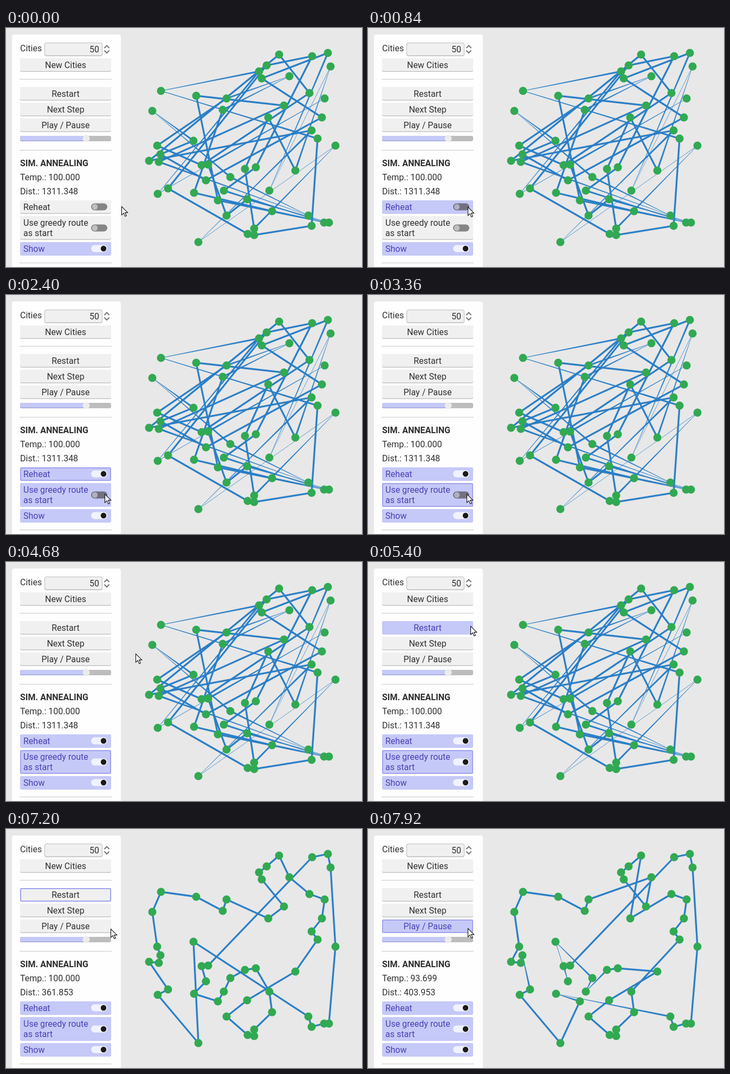
These frames come from a looping animation (657 px wide and 441 px high, 8000 ms). An HTML page:

```html
<!DOCTYPE html>
<html lang="en">
<head>
<meta charset="utf-8">
<title>Simulated annealing</title>
<style>
html, body { margin: 0; width: 100%; height: 100%; overflow: hidden; background: #e8e8e8; }
svg { display: block; width: 657px; height: 441px; font: 16px Roboto, sans-serif; }
</style>
</head>
<body>
<svg id="stage" viewBox="0 0 657 441"></svg>
<script>
const LOOP = 8000, STEP = 120;
const INK = '#303030', PURPLE = '#4a40b4', LILAC = '#c5c9f7', FOCUS = '#a0a3ee';
const stage = document.getElementById('stage');

function add(tag, attrs, text) {
  const el = document.createElementNS('http://www.w3.org/2000/svg', tag);
  set(el, attrs);
  if (text) el.textContent = text;
  return stage.appendChild(el);
}
function set(el, attrs) {
  for (const k in attrs) el.setAttribute(k, attrs[k]);
}
const rect = (x, y, width, height, fill, rx = 0) => add('rect', { x, y, width, height, fill, rx });
const label = (x, y, text, extra) => add('text', { x, y, fill: INK, ...extra }, text);
const clamp = v => Math.max(0, Math.min(1, v));
const mix = (a, b, k) => 'rgb(' + a.map((v, i) => Math.round(v + (b[i] - v) * k)) + ')';

// Cities and routes
const cities = [
  504,49, 565,52, 594,46, 599,71, 481,69, 467,80, 472,93, 523,89, 560,120, 588,130,
  286,116, 351,125, 407,130, 400,151, 513,143, 484,165, 583,165, 270,153, 564,189, 575,204,
  608,217, 346,208, 279,217, 285,233, 264,245, 282,247, 361,253, 373,252, 441,260, 461,257,
  534,263, 414,275, 369,281, 299,296, 280,306, 347,304, 402,300, 486,300, 391,318, 445,316,
  491,338, 407,346, 558,346, 564,365, 587,359, 596,359, 458,370, 446,380, 458,382, 355,395
].reduce((out, v, i, all) => (i % 2 ? out.push([all[i - 1], v]) : 0, out), []);

const shuffled = [
  48,43,19,10,5,34,9,27,41,39,45,40,35,13,7,12,22,26,8,0,24,18,49,20,46,
  28,15,30,3,37,2,6,16,32,23,21,17,31,42,25,14,11,38,44,36,29,1,4,33,47];

function greedyRoute(start) {
  const left = new Set(cities.keys()), route = [start];
  left.delete(start);
  while (left.size) {
    const [x, y] = cities[route[route.length - 1]];
    const dist = i => Math.hypot(cities[i][0] - x, cities[i][1] - y);
    const next = [...left].reduce((a, b) => dist(b) < dist(a) ? b : a);
    route.push(next);
    left.delete(next);
  }
  return route;
}

// Reverses the part of the route between two cities
function flip(route, [a, b]) {
  const i = route.indexOf(a), j = route.indexOf(b) + 1;
  return [...route.slice(0, i), ...route.slice(i, j).reverse(), ...route.slice(j)];
}

// Mitred strip that collapses at very sharp turns
function strip(route, half = 1.5) {
  const n = route.length, pts = route.map(i => cities[i]);
  const normals = pts.map(([x, y], i) => {
    const [u, v] = pts[(i + 1) % n], len = Math.hypot(u - x, v - y);
    return [(y - v) / len, (u - x) / len];
  });
  const offsets = normals.map(([x, y], i) => {
    const [u, v] = normals[(i + n - 1) % n], len = Math.hypot(x + u, y + v) || 1e-3;
    const k = len < 0.49 ? half / len : 2 * half / (len * len);
    return [(x + u) * k, (y + v) * k];
  });
  const at = (i, sign) => pts[i].map((c, k) => (c + sign * offsets[i][k]).toFixed(2)).join(' ');
  return pts.map((_, i) => {
    const j = (i + 1) % n;
    return `M${at(i, 1)}L${at(j, 1)}L${at(j, -1)}L${at(i, -1)}Z`;
  }).join('');
}

const greedy = greedyRoute(27);
const annealed = [[35, 21], [49, 36], [36, 31], [37, 30], [7, 15], [14, 0], [23, 24]].reduce(flip, greedy);
const phases = [
  { from: 0, d: strip(shuffled), temp: '100.000', dist: '1311.348' },
  { from: 6360, d: strip(greedy), temp: '100.000', dist: '361.853' },
  { from: 7920, d: strip(annealed), temp: '93.699', dist: '403.953' }
];

const edges = add('path', { fill: '#2a7ec6', stroke: '#2a7ec6', 'stroke-width': 0.3 });
for (const [cx, cy] of cities) add('circle', { cx, cy, r: 7.5, fill: '#31a952' });

// Panel
rect(11, 12, 201, 450, '#fefefe', 4);
label(26, 43, 'Cities');
rect(71, 27, 107, 25, '#bdbdbd', 4);
rect(72, 28, 105, 22.5, '#f0f0f0', 3);
label(172, 45, '50', { 'text-anchor': 'end' });
add('path', { d: 'M181.500 37L186 32.500L190.500 37M181.500 41.500L186 46L190.500 41.500', fill: 'none', stroke: '#777', 'stroke-width': 2 });
for (const y of [94, 225, 433]) rect(25, y, 170, 1, '#c8c8c8');

rect(26, 199, 168, 10, '#bdbdbd', 3);
rect(26, 199, 122, 10, '#a4a8dc', 3);
rect(26, 199, 122, 8.5, LILAC, 3);
add('circle', { cx: 148, cy: 204, r: 6.5, fill: '#ececec' });

label(26, 255, 'SIM. ANNEALING', { 'font-weight': 700 });
const temp = label(26, 281, ' ');
const dist = label(26, 307, ' ');

// Times: hover [from, to], focus [from, to], on: when the switch turns
const never = [LOOP, LOOP];
const buttons = [
  { y: 56, text: ['New Cities'] },
  { y: 109, text: ['Restart'], hover: [5280, 6600], focus: [6120, 7800] },
  { y: 138, text: ['Next Step'] },
  { y: 167, text: ['Play / Pause'], hover: [7800, LOOP], focus: [7800, LOOP] },
  { y: 318, text: ['Reheat'], hover: [720, 2160], focus: [1680, 3360], on: 1800 },
  { y: 347, text: ['Use greedy route', 'as start'], hover: [2160, 3840], focus: [3360, 6120], on: 3480 },
  { y: 395, text: ['Show'], on: -1000 }
].map(b => {
  const isSwitch = 'on' in b, h = b.text.length > 1 ? 44 : 25;
  const view = { hover: never, focus: never, ...b };
  view.base = rect(26, b.y, 168, h, '#c6c6c6', 3);
  view.face = rect(26, b.y, 168, h - 1.5, '#f0f0f0', 3);
  view.ring = add('rect', { x: 27, y: b.y + 1, width: 166, height: h - 2, rx: 2, fill: 'none', stroke: FOCUS, 'stroke-width': 2 });
  view.labels = b.text.map((text, i) => isSwitch
    ? label(32, b.y + 18 + 19 * i, text)
    : label(110, b.y + 18, text, { 'text-anchor': 'middle' }));
  if (isSwitch) {
    const cy = b.y + h / 2 - (h > 25 ? 0 : 0.5);
    view.track = rect(157, cy - 6.5, 30, 13, '#858585', 6.5);
    view.knob = add('circle', { cy, r: 5.2 });
  }
  return view;
});

// Pointer
const glow = add('circle', { r: 11.5, fill: '#e6dc1e', 'fill-opacity': 0.6 });
const pointer = add('path', {
  d: 'M0.500 0.500V16L4.200 12.600L6.800 18.600L9.300 17.500L6.700 11.600H11.700Z',
  fill: '#fff', stroke: '#111', 'stroke-width': 1.1
});
const trail = [
  [360, 213, 329], [840, 184, 330], [1920, 184, 330], [2400, 182, 367], [3480, 182, 367],
  [4080, 243, 307], [4680, 239, 169], [4800, 239, 169], [5400, 189, 118], [6480, 189, 118],
  [6840, 197, 150], [7200, 193, 184], [7320, 193, 184], [7560, 184, 183], [LOOP, 184, 183]
];
const clicks = [1680, 3480, 6120, 7800];

function pointerAt(t) {
  const i = trail.findIndex(k => k[0] > t);
  if (i === 0) return trail[0].slice(1);
  const [t0, x0, y0] = trail[i - 1], [t1, x1, y1] = trail[i];
  const k = (t - t0) / (t1 - t0), e = k * k * (3 - 2 * k);
  return [x0 + (x1 - x0) * e, y0 + (y1 - y0) * e];
}

function render(t) {
  const within = ([a, b]) => t >= a && t < b;
  const phase = phases.filter(p => t >= p.from).pop();
  set(edges, { d: phase.d });
  temp.textContent = 'Temp.: ' + phase.temp;
  dist.textContent = 'Dist.: ' + phase.dist;

  for (const b of buttons) {
    const on = 'on' in b ? clamp((t - b.on) / 240) : 0;
    const lit = within(b.hover) || on > 0;
    set(b.base, { fill: lit ? LILAC : '#c6c6c6' });
    set(b.face, { fill: lit ? LILAC : '#f0f0f0' });
    set(b.ring, { visibility: within(b.focus) ? 'visible' : 'hidden' });
    for (const el of b.labels) set(el, { fill: lit ? PURPLE : INK });
    if (b.track) {
      set(b.track, { fill: mix(lit ? [113, 113, 130] : [133, 133, 133], [240, 242, 254], on) });
      set(b.knob, { cx: 164 + 16 * on, fill: mix(lit ? [176, 176, 190] : [192, 192, 192], [26, 26, 26], on) });
    }
  }

  const [x, y] = pointerAt(t);
  set(pointer, { transform: `translate(${x.toFixed(1)} ${y.toFixed(1)})` });
  set(glow, { cx: x - 1, cy: y, visibility: clicks.some(c => within([c, c + STEP])) ? 'visible' : 'hidden' });
}

const start = performance.now();
function tick() {
  const t = (performance.now() - start) % LOOP;
  render(Math.floor(t / STEP) * STEP);
  requestAnimationFrame(tick);
}
tick();
</script>
</body>
</html>
```
